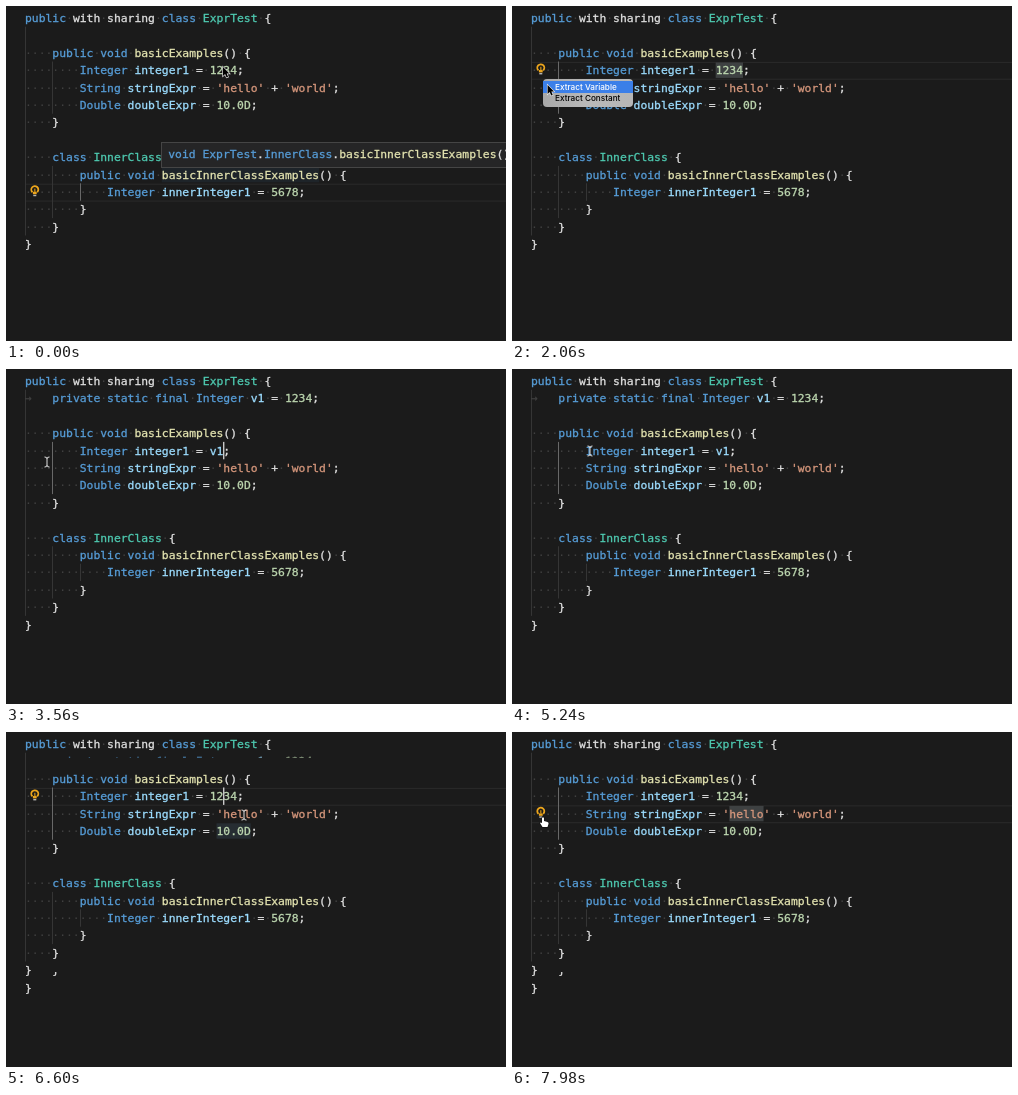
Recreate the animation shown at these times as an HTML page with a canvas. Size 500 by 335 pixels, loop 8000 ms.

```html
<!DOCTYPE html>
<html>
<head>
<meta charset="utf-8">
<style>
html, body { margin: 0; width: 100%; height: 100%; overflow: hidden; background: #1b1b1b; }
canvas { display: block; }
</style>
</head>
<body>
<canvas id="stage" width="500" height="335"></canvas>
<script>
const ctx = document.getElementById('stage').getContext('2d');
const LOOP = 8000, LEFT = 19, CHAR = 6.84, ROW = 17.4, TOP = 3.3;
const MONO = '11.36px "DejaVu Sans Mono", monospace';
const GHOST = '→   private static final Integer v1 = 1234;';
const CODE = `public with sharing class ExprTest {

    public void basicExamples() {
        Integer integer1 = 1234;
        String stringExpr = 'hello' + 'world';
        Double doubleExpr = 10.0D;
    }

    class InnerClass {
        public void basicInnerClassExamples() {
            Integer innerInteger1 = 5678;
        }
    }
}`.split('\n');
const EXTRACTED = [CODE[0], GHOST, ...CODE.slice(1)];
EXTRACTED[4] = EXTRACTED[4].replace('1234', 'v1');

const colX = col => LEFT + col * CHAR;
const rowY = row => TOP + row * ROW;

function colorOf(token, next) {
  if (/^[ →]/.test(token)) return '#404040';
  if (token[0] === "'") return '#d6977c';
  if (/^\d/.test(token)) return '#bcd6af';
  if (/^(public|private|static|final|class|void|Integer|String|Double)$/.test(token)) return '#569cd6';
  if (/^(ExprTest|InnerClass)$/.test(token)) return next === ' ' ? '#4ec9b0' : '#569cd6';
  if (!/^\w/.test(token) || /^(with|sharing)$/.test(token)) return '#e0e0e0';
  return next === '(' ? '#e3e3b0' : '#9cdcfe';
}

function codeText(text, x, y) {
  ctx.font = MONO;
  ctx.lineWidth = 0.3;
  for (const m of text.matchAll(/→ +|'[^']*'|[\w]+(?:\.\d\w+)?| +|[^\w\s]/g)) {
    const token = m[0], blank = token[0] === ' ', tx = x + m.index * CHAR;
    ctx.fillStyle = ctx.strokeStyle = colorOf(token, text[m.index + token.length]);
    ctx.fillText(blank ? '·'.repeat(token.length) : token, tx, y);
    if (!blank) ctx.strokeText(token, tx, y);
  }
}

const codeLine = (text, row) => codeText(text, LEFT, rowY(row) + 12.7);

function clipped(y, h, draw) {
  ctx.save();
  ctx.beginPath();
  ctx.rect(0, y, 500, h);
  ctx.clip();
  draw();
  ctx.restore();
}

function box(x, y, w, h, fill) {
  ctx.fillStyle = fill;
  ctx.fillRect(x, y, w, h);
}

function guide(col, row, count, active) {
  box(Math.round(colX(col)), rowY(row), 1, count * ROW, active ? '#686868' : '#353535');
}

function lineHighlight(row) {
  box(LEFT, rowY(row) + 0.4, 481, 1.1, '#282828');
  box(LEFT, rowY(row + 1) - 0.2, 481, 1.1, '#282828');
}

function wordHighlight(col, row, length, fill = '#3e4142') {
  box(colX(col), rowY(row) + 1, length * CHAR, ROW - 2, fill);
}

const caret = (col, row) => box(Math.round(colX(col)), rowY(row), 1.4, ROW, '#c8c8c8');

function bulb(row) {
  const y = rowY(row) + 6.3;
  ctx.strokeStyle = '#eda61c';
  ctx.lineWidth = 1.8;
  ctx.beginPath();
  ctx.arc(28.8, y, 3.5, 2.3, 7.1);
  ctx.stroke();
  box(26.9, y + 2.2, 3.8, 2.4, '#eda61c');
  box(28.1, y - 1, 1.4, 3.4, '#b98318');
  box(27.3, y + 5.2, 3, 1.4, '#b5b5b5');
}

function tooltip() {
  box(155, 136, 350, 26, '#454545');
  box(156, 137, 350, 24, '#252526');
  codeText('void\u00a0ExprTest.InnerClass.basicInnerClassExamples()', 162.2, 152);
}

function menu(selected, alpha) {
  ctx.save();
  ctx.globalAlpha = alpha;
  const fill = ctx.createLinearGradient(31, 0, 121, 0);
  fill.addColorStop(0, '#a8a8a8');
  fill.addColorStop(0.5, '#bababa');
  fill.addColorStop(1, '#b6b6b6');
  ctx.fillStyle = fill;
  ctx.beginPath();
  ctx.roundRect(31, 73, 90, 28, 4);
  ctx.fill();
  ctx.font = '500 8.2px Inter, sans-serif';
  ['Extract Variable', 'Extract Constant'].forEach((label, i) => {
    if (i === selected) box(31, 75 + i * 12, 90, 12, '#3b7fe8');
    ctx.fillStyle = i === selected ? '#fff' : '#000';
    ctx.fillText(label, 43, 83.5 + i * 11.7);
  });
  ctx.restore();
}

const POINTERS = {
  arrow: 'M0 0V9L2.1 7.1L3.6 10.4L5.1 9.8L3.7 6.5H6.4Z',
  hand: 'M-2 -4Q-1 -5.5 0 -4V-1L3.5 0Q5 .5 4.5 2L3.5 5H-1.5L-4 1Q-3.5 0 -2 1Z'
};

function pointer(x, y, kind) {
  ctx.save();
  ctx.translate(x, y);
  if (kind === 'beam') {
    ctx.strokeStyle = '#e0e0e0';
    ctx.lineWidth = 1;
    ctx.stroke(new Path2D('M-2.5 -5Q0 -5 0 -3.5Q0 -5 2.5 -5M0 -4V4M-2.5 5Q0 5 0 3.5Q0 5 2.5 5'));
  } else {
    const shape = new Path2D(POINTERS[kind]);
    ctx.lineWidth = 1.3;
    ctx.strokeStyle = kind === 'hand' ? '#111' : '#e8e8e8';
    ctx.stroke(shape);
    ctx.fillStyle = kind === 'hand' ? '#fff' : '#000';
    ctx.fill(shape);
  }
  ctx.restore();
}

// time, x, y, pointer kind from that time on
const MOUSE = [
  [0, 217, 61, 'arrow'], [80, 217, 61, 'beam'], [420, 218, 66, 'beam'],
  [1080, 37, 74, 'beam'], [1180, 36, 75, 'beam'], [1300, 33, 72, 'hand'],
  [1500, 31, 68, 'hand'], [1660, 31, 68, 'arrow'], [1900, 34, 76, 'arrow'],
  [2460, 42, 91, 'arrow'], [2520, 42, 92.5, 'arrow'], [3100, 41, 93, 'beam'],
  [4280, 41, 93, 'beam'], [4460, 43, 95, 'beam'], [5060, 43, 95, 'beam'],
  [5240, 78, 82, 'beam'], [5860, 237, 110, 'beam'], [6250, 237, 110, 'beam'],
  [6580, 238, 83, 'beam'], [7380, 238, 83, 'beam'], [7820, 35, 88, 'hand'],
  [7960, 32, 90, 'hand'], [LOOP, 32, 90, 'hand']
];

function drawPointer(t) {
  const i = MOUSE.findIndex(key => key[0] > t);
  const [t0, x0, y0, kind] = MOUSE[i - 1], [t1, x1, y1] = MOUSE[i];
  const p = (t - t0) / (t1 - t0), e = p * p * (3 - 2 * p);
  pointer(x0 + (x1 - x0) * e, y0 + (y1 - y0) * e, kind);
}

function draw(t) {
  const during = (from, to) => t >= from && t < to;
  const extracted = during(3100, 6200), undone = t >= 6200;
  const shift = extracted ? 1 : 0;
  const inner = t < 120;
  box(0, 0, 500, 335, '#1b1b1b');

  if (inner) lineHighlight(10);
  else if (!extracted) lineHighlight(t < 6740 ? 3 : 4);

  if (during(420, 3100)) wordHighlight(27, 3, 4);
  if (during(5880, 6740)) wordHighlight(28, 5 + shift, 5, '#262d32');
  if (t >= 7300) wordHighlight(29, 4, 5);
  if (t < 200) wordHighlight(20, 9, 23, '#1e2429');

  guide(0, 1, 12 + shift);
  guide(4, 3 + shift, 3, !inner);
  guide(4, 9 + shift, 3);
  guide(8, 10 + shift, 1, inner);
  (extracted ? EXTRACTED : CODE).forEach(codeLine);

  // Stale pixels left on screen by the undo
  if (undone) {
    codeLine('}', 14);
    clipped(240, 6, () => codeText('}', colX(4), rowY(13) + 12.7));
    if (t < 6740) clipped(24, 1.4, () => codeLine(GHOST, 1));
  }

  if (during(160, 660)) caret(29, 3);
  if (during(3200, 3860) || during(4380, 5060)) caret(29, 4);
  if (during(6240, 6740)) caret(29, 3);
  if (during(6740, 7280)) caret(32, 4);

  if (inner) bulb(10);
  if (during(700, 3100) || during(6400, 7300)) bulb(3);
  if (t >= 7340) bulb(4);
  if (t < 200) tooltip();
  if (during(1680, 3100)) {
    const selected = during(2250, 2840) || t >= 2900 ? 1 : during(1950, 2250) ? 0 : -1;
    menu(selected, Math.min(1, (3100 - t) / 140));
  }
  drawPointer(t);
}

function frame() {
  draw(performance.now() % LOOP);
  requestAnimationFrame(frame);
}
frame();
</script>
</body>
</html>
```
